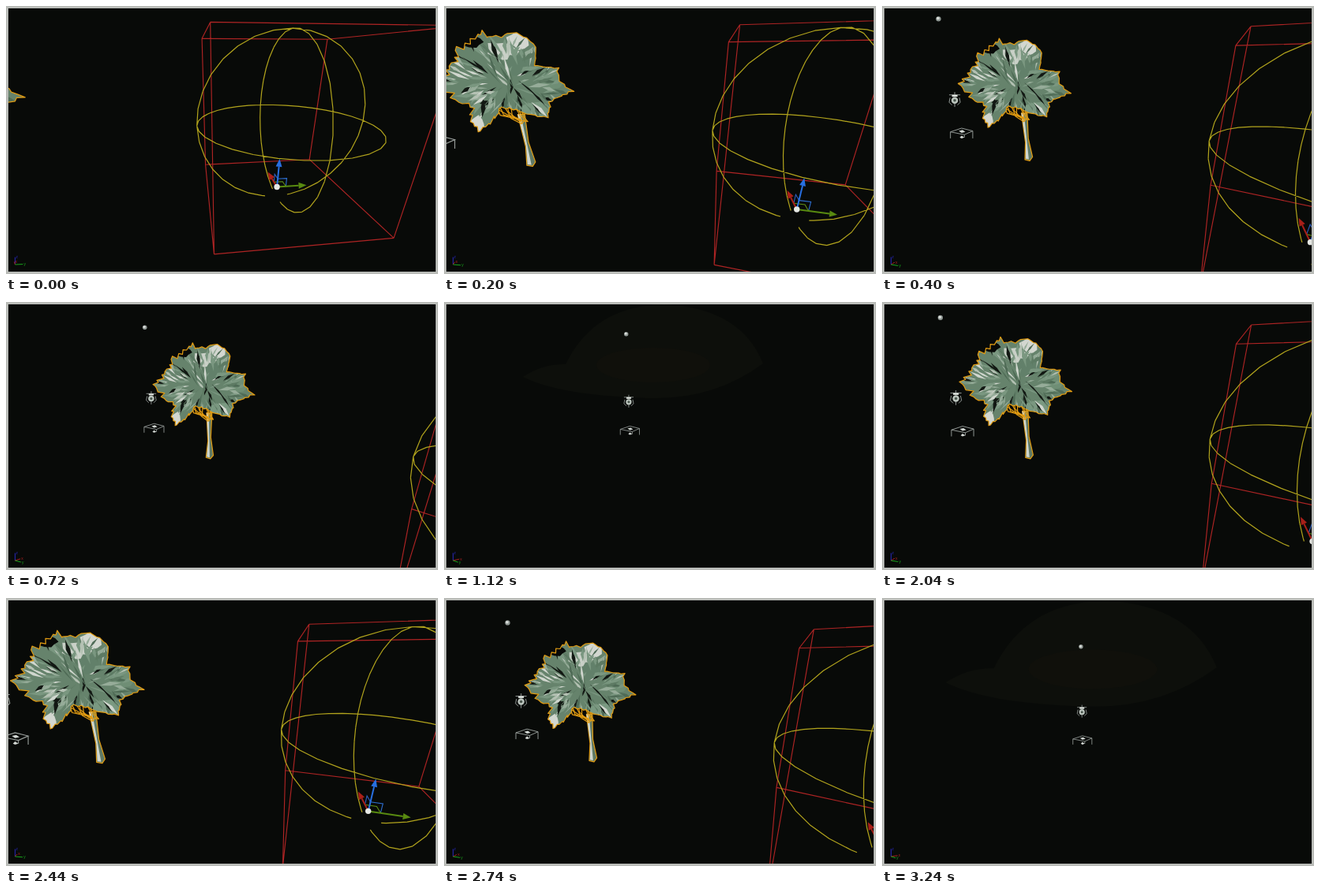
Animation of 547x340 px, one loop 3640 ms. Source, as an HTML page:

```html
<!DOCTYPE html>
<html lang="en">
<head>
<meta charset="utf-8">
<title>Viewport orbit</title>
<style>
html, body { margin: 0; width: 100%; height: 100%; overflow: hidden; background: #080a08; }
svg { display: block; width: 100vw; height: 100vh; }
path { fill: none; }
.red { stroke: #ae2424; stroke-width: 1.15; }
.yellow { stroke: #b2a41c; stroke-width: 1.2; }
.edge { stroke: #e29c12; stroke-width: 1.2; stroke-linejoin: round; }
.wire { stroke: #9aa09d; stroke-width: .8; }
</style>
</head>
<body>
<svg viewBox="0 0 547 340">
  <defs>
    <clipPath id="view"><rect x="3" y="3" width="541" height="334"/></clipPath>
    <clipPath id="crownClip"><path id="crownShape"/></clipPath>
  </defs>
  <rect width="547" height="340" fill="#babcb8"/>
  <rect x="3" y="3" width="541" height="334" fill="#080a08"/>
  <g clip-path="url(#view)">
    <g id="dome">
      <path d="M100 95Q125 78 154 79Q190 4 280 3Q376 8 404 78Q345 122 268 122Q150 120 100 95Z" style="fill:#0d0f0b"/>
      <ellipse cx="265" cy="80" rx="72" ry="22" fill="#10100b"/>
    </g>
    <g id="tree">
      <g id="trunk"></g>
      <g id="crown" clip-path="url(#crownClip)"></g>
      <path id="crownEdge" class="edge"/>
    </g>
    <g id="ball">
      <circle r="2.7" fill="#8f9793"/><circle cx="-.5" cy="-.6" r="1.5" fill="#d9ddda"/>
    </g>
    <g id="bulb">
      <path class="wire" d="M-6 -5H6M0 -8V-3M-5 -2L-6 3L-3 6M5 -2L6 3L3 6M0 4V8"/>
      <circle cy="1" r="3.6" fill="#bcc5be"/><circle cy="1" r="1.5" fill="#49564d"/>
      <path d="M-3 -4H3" stroke="#dfe4df" stroke-width="2"/>
    </g>
    <g id="table">
      <path class="wire" d="M-12 -2L0 -6L12 -3L3 1ZM-12 -2V5M12 -3V5M3 1V4"/>
      <path d="M-3 -3L1 -4L4 -2L0 -1ZM-2 4L0 2L3 4L0 5Z" style="fill:#d3d8d4"/>
    </g>
    <path id="box" class="red"/>
    <path id="rings" class="yellow"/>
    <g id="gizmo"></g>
    <g id="axes" font-family="Liberation Sans, Arial, sans-serif" font-size="5"></g>
  </g>
</svg>
<script>
const $ = id => document.getElementById(id);
const set = (id, name, value) => $(id).setAttribute(name, value);
const rad = Math.PI / 180;

// Camera: [step, yaw, pitch] in degrees, joined by a monotone spline
const CAMERA = [[0, 0, 20.8], [2, 19.9, 20], [7, 48.3, 17.4], [11, 57.6, 16.3], [13, 58, 16.3], [14, 58, 16.3],
  [20, 33.7, 18.4], [24, 21.6, 18.4], [32, 61.3, 12.8]];
const FOCAL = 292, NEAR = .1;
let yaw, pitch;

function spline(x, col) {
  const slope = i => i < 0 || i > CAMERA.length - 2 ? null
    : (CAMERA[i + 1][col] - CAMERA[i][col]) / (CAMERA[i + 1][0] - CAMERA[i][0]);
  const tangent = i => {
    const a = slope(i - 1), b = slope(i);
    if (a === null) return b;
    if (b === null || a * b <= 0) return 0;
    return 2 * a * b / (a + b);
  };
  let i = 0;
  while (i < CAMERA.length - 2 && x > CAMERA[i + 1][0]) i++;
  const a = CAMERA[i], b = CAMERA[i + 1], w = b[0] - a[0], f = (x - a[0]) / w, g = 1 - f;
  return a[col] * g * g * (1 + 2 * f) + b[col] * f * f * (1 + 2 * g)
    + w * f * g * (tangent(i) * g - tangent(i + 1) * f);
}

// World points are [right, forward, up] from the camera, which only turns
function toCamera([r, f, u]) {
  const c = Math.cos(yaw), s = Math.sin(yaw), fwd = f * c - r * s;
  return [r * c + f * s, u * Math.cos(pitch) + fwd * Math.sin(pitch), fwd * Math.cos(pitch) - u * Math.sin(pitch)];
}
const toScreen = ([x, y, z]) => [273.5 + FOCAL * x / z, 170 - FOCAL * y / z];
const project = p => toScreen(toCamera(p));
const lerp = (a, b, f) => a.map((v, i) => v + (b[i] - v) * f);
const add = (p, dir, n) => p.map((v, i) => v + dir[i] * n);
const poly = pts => 'M' + pts.map(p => p.map(n => n.toFixed(1)).join(' ')).join('L');

// Polyline in space, cut at the near plane
function trace(points) {
  const cam = points.map(toCamera);
  let d = '';
  for (let i = 1; i < cam.length; i++) {
    let a = cam[i - 1], b = cam[i];
    if (a[2] < NEAR && b[2] < NEAR) continue;
    const cut = lerp(a, b, (NEAR - a[2]) / (b[2] - a[2]));
    if (a[2] < NEAR) a = cut;
    if (b[2] < NEAR) b = cut;
    d += poly([toScreen(a), toScreen(b)]);
  }
  return d;
}

// Bounds: a box and a sphere around one centre
const TURN = 6.3 * rad, CENTER = [.417, 1.51, -.45], RADIUS = .585;
const AXIS_X = [-Math.sin(TURN), Math.cos(TURN), 0], AXIS_Y = [Math.cos(TURN), Math.sin(TURN), 0], AXIS_Z = [0, 0, 1];
const corner = (x, y, z) => add(add(add(CENTER, AXIS_X, x * .527), AXIS_Y, y * .52), AXIS_Z, z * .553);
const face = z => [[1, -1], [1, 1], [-1, 1], [-1, -1], [1, -1]].map(([x, y]) => corner(x, y, z));
const BOX = [face(1), face(-1), ...face(1).slice(1).map((p, i) => [p, face(-1)[i + 1]])];

// A circle starting at the end of axis b, open there by the given gap
function ring(a, b, gap) {
  return Array.from({ length: 33 }, (_, i) => {
    const t = Math.max(gap, Math.min(360 - gap, i * 11.25)) * rad;
    return add(add(CENTER, a, RADIUS * Math.sin(t)), b, RADIUS * Math.cos(t));
  });
}
const DOWN = [0, 0, -1];
const RINGS = [ring(AXIS_X, AXIS_Y, 0), ring(AXIS_Y, DOWN, 8.6), ring(AXIS_X, DOWN, 8.6)];
const boundsInView = () => RINGS.flat().map(toCamera).some(p => p[2] > NEAR && toScreen(p)[0] < 544);

// Stack of icons: one bearing, different heights
const ICON_BEARING = -65.3 * rad;
const ICONS = { ball: .132, bulb: -.134, table: -.266 };

// Tree: flat parts in local units, x to the right and y up from the foot
const TREE_BEARING = -51.6 * rad;
let seed = 23;
const rnd = () => (seed = seed * 16807 % 2147483647) / 2147483647;
const spread = n => (rnd() - .5) * 2 * n;
const CROWN = [[-68, 98], [-50, 114], [-42, 128], [-17, 143], [-14, 137], [11, 142], [20, 137], [27, 128], [23, 112],
  [46, 109], [44, 98], [58, 84], [34, 75], [27, 56], [0, 64], [-17, 70], [-31, 54], [-45, 46], [-49, 58], [-46, 72], [-60, 82]];
const parts = [];

function treePoint([x, y]) {
  const turn = (TREE_BEARING - yaw) / 2, s = .00338 * x;
  return project([Math.sin(TREE_BEARING) + s * Math.cos(turn), Math.cos(TREE_BEARING) - s * Math.sin(turn), -.425 + .00353 * y]);
}

function part(parent, pts, fill, edge) {
  const el = document.createElementNS('http://www.w3.org/2000/svg', 'path');
  if (fill) el.style.fill = fill;
  if (edge) el.setAttribute('class', 'edge');
  $(parent).append(el);
  parts.push({ el, pts, end: fill ? 'Z' : '' });
}

// Split each side into ragged teeth, deeper towards the left
const crownLine = CROWN.flatMap((p, i) => {
  const q = CROWN[(i + 1) % CROWN.length], n = Math.ceil(Math.hypot(q[0] - p[0], q[1] - p[1]) / 4);
  return Array.from({ length: n }, (_, j) => {
    const [x, y] = lerp(p, q, j / n), inset = j % 2 ? (x < -28 ? .15 : .06) * rnd() : 0;
    return [x - (x + 5) * inset + spread(1), y - (y - 95) * inset + spread(1)];
  });
});

function blob(x, y, rx, ry, fill) {
  part('crown', Array.from({ length: 11 }, (_, i) => {
    const a = i / 11 * 2 * Math.PI, k = .75 + rnd() * .5;
    return [x + rx * k * Math.cos(a), y + ry * k * Math.sin(a)];
  }), fill);
}

function leaf(x, y, angle, len, width, fill) {
  const c = Math.cos(angle), s = Math.sin(angle);
  part('crown', [[x - c * len, y - s * len], [x - s * width, y + c * width], [x + c * len, y + s * len],
    [x + s * width * .6, y - c * width * .6]], fill);
}

function buildTree() {
  part('trunk', [[-3, 62], [4, 62], [2, 30], [5, 5], [1, 0], [-5, 2], [-2, 25]], '#5f7a66', true);
  part('trunk', [[-3, 62], [0, 62], [0, 27], [0, 2], [-4, 3], [-1.5, 25]], '#cfd6ce');
  for (let i = 0; i < 9; i++) {
    const x = -24 + i * 3.2, y = 58 + spread(5);
    part('trunk', [[x, y + 13], [x + spread(4), y + 5], [x + 4, y], [-1, 54 + spread(3)]], null, true);
  }
  part('crown', crownLine, '#66836c');
  blob(-6, 125, 14, 9, '#c9d0c7');
  blob(12, 135, 10, 8, '#d3d7d0');
  blob(11, 112, 13, 11, '#62806a');
  blob(36, 98, 16, 9, '#6f8e75');
  blob(16, 66, 15, 8, '#7a9981');
  blob(-43, 54, 6, 9, '#d3d7d0');
  const tones = ['#4f6b56', '#5d7a63', '#7a9780', '#96ac99', '#b4c1b3', '#d0d6ce', '#121813'];
  for (let i = 0; i < 170; i++) {
    const a = rnd() * 2 * Math.PI, r = Math.sqrt(rnd());
    const x = -5 + 58 * r * Math.cos(a), y = 95 + 42 * r * Math.sin(a);
    const pale = x < -20 || rnd() < .2 ? 2 : 0;
    const tone = rnd() < .12 ? 6 : pale + Math.floor(rnd() * 4);
    leaf(x, y, a + spread(.5), 4 + rnd() * 8, .8 + rnd() * 2, tones[tone]);
  }
  blob(-31, 133, 10, 5, '#080a08');
}

function drawTree() {
  for (const { el, pts, end } of parts) el.setAttribute('d', poly(pts.map(treePoint)) + end);
  const d = poly(crownLine.map(treePoint)) + 'Z';
  set('crownShape', 'd', d);
  set('crownEdge', 'd', d);
}

function gizmoMarkup() {
  const base = add(CENTER, AXIS_Z, -.505), o = project(base);
  if (toCamera(base)[2] < NEAR) return '';
  const arrow = (axis, color) => {
    const tip = project(add(base, axis, .235)), dx = tip[0] - o[0], dy = tip[1] - o[1], l = Math.hypot(dx, dy);
    const ux = dx / l, uy = dy / l, b = [tip[0] - ux * 10, tip[1] - uy * 10];
    return `<path d="${poly([o, b])}" stroke="${color}" stroke-width="2"/>`
      + `<path d="${poly([tip, [b[0] - uy * 4, b[1] + ux * 4], [b[0] + uy * 4, b[1] - ux * 4]])}Z" style="fill:${color}"/>`;
  };
  const square = (a, b, color) => {
    const p = add(base, a, .07), q = add(base, b, .07);
    return `<path d="${poly([p, add(p, b, .07), q].map(project))}" stroke="${color}" stroke-width="1.1"/>`;
  };
  return square(AXIS_Z, AXIS_Y, '#2e6fd0') + square(AXIS_X, AXIS_Z, '#2e5fc0') + square(AXIS_X, AXIS_Y, '#5f9018')
    + arrow(AXIS_X, '#a81f18') + arrow(AXIS_Y, '#588a10') + arrow(AXIS_Z, '#286fe0')
    + `<circle cx="${o[0]}" cy="${o[1]}" r="3.7" fill="#e6e8e4"/>`;
}

// Small orientation mark, without perspective
function axesMarkup() {
  const o = [11.5, 328];
  return [[AXIS_Z, '#2626b0', 'z'], [AXIS_X, '#a82020', 'x'], [AXIS_Y, '#18a51c', 'y']].map(([axis, color, name]) => {
    const [x, y] = toCamera(axis), p = [o[0] + 10 * x, o[1] - 10 * y];
    return `<path d="${poly([o, p])}" stroke="${color}"/><text x="${p[0] + 1}" y="${p[1] + 1.5}" fill="${color}">${name}</text>`;
  }).join('');
}

// The picture advances in steps of 100 ms, two of them 20 ms longer
function stepAt(t) {
  if (t < 520) return Math.min(4, Math.floor(t / 100));
  if (t < 1940) return Math.min(18, Math.floor((t - 20) / 100));
  return Math.min(32, Math.floor((t - 40) / 100));
}

function draw(step) {
  yaw = spline(step, 1) * rad;
  pitch = spline(step, 2) * rad;
  set('box', 'd', BOX.map(trace).join(''));
  set('rings', 'd', RINGS.map(trace).join(''));
  $('gizmo').innerHTML = gizmoMarkup();
  $('axes').innerHTML = axesMarkup();

  // The tree is culled as soon as its bounds leave the view
  const shown = boundsInView();
  set('tree', 'visibility', shown ? 'visible' : 'hidden');
  set('dome', 'visibility', shown ? 'hidden' : 'visible');
  if (shown) drawTree();
  const grow = 1 + (16.3 - pitch / rad) * .037;
  set('dome', 'transform', `translate(${250 * (1 - grow)} 0) scale(${grow})`);

  for (const id in ICONS) {
    const p = project([Math.sin(ICON_BEARING), Math.cos(ICON_BEARING), ICONS[id]]);
    set(id, 'transform', `translate(${p}) scale(${1 / Math.cos(ICON_BEARING + yaw)})`);
  }
}

buildTree();
const start = performance.now();
let last = -1;
function loop() {
  const step = stepAt((performance.now() - start) % 3640);
  if (step !== last) draw(last = step);
  requestAnimationFrame(loop);
}
loop();
</script>
</body>
</html>
```
